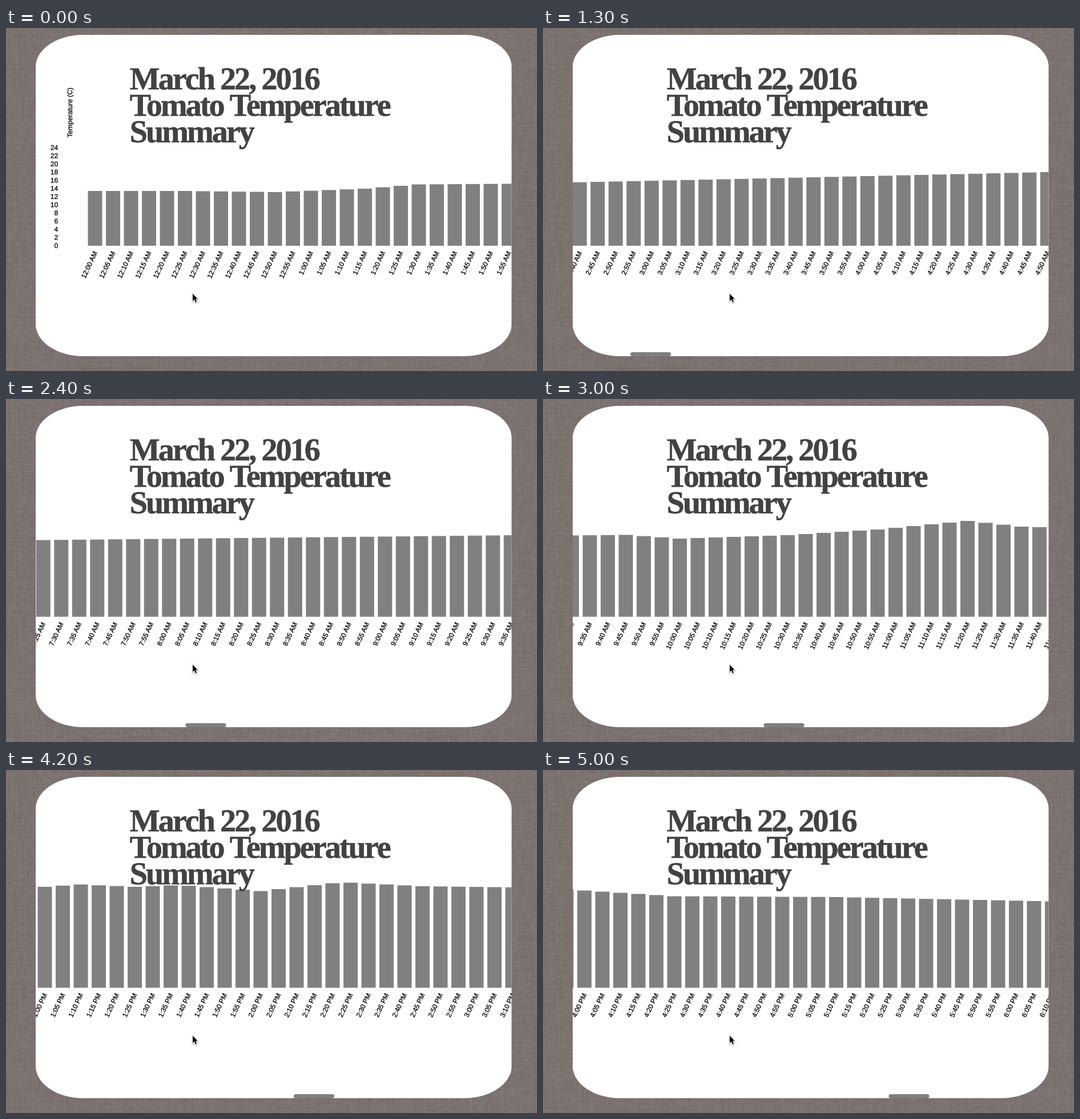
A matplotlib script that plays this animation: 930x602 px, repeating every 5.1 s.

```python
import numpy as np
import matplotlib.pyplot as plt
from matplotlib.animation import FuncAnimation
from matplotlib.patches import PathPatch, Polygon
from matplotlib.path import Path
from matplotlib.textpath import TextPath
from matplotlib.transforms import Affine2D

W, H, DPI = 930, 602, 100
PX = 72 / DPI
FRAMES, INTERVAL = 51, 100

LEFT, TOP, RIGHT, BOTTOM = 52, 12, 885.5, 576
BASE_Y, TICK_STEP = 382.2, 172 / 12
BAR_X, BAR_W, PITCH = 143.5, 25, 31.5
BAR_COUNT = 222

SANS = {"family": "Liberation Sans"}
SERIF = {"family": "Liberation Serif", "weight": "bold"}

# Turning points of the day: five-minute slot and bar top in pixels.
TURNS = [
    (0, 286), (5, 286), (10, 288), (15, 282), (18, 274.5), (30, 272),
    (40, 265.5), (58, 253), (72, 250.5), (80, 250.5), (117, 238.5),
    (120, 245), (126, 239), (131, 229), (136, 214), (139, 224), (144, 228.5),
    (158, 201), (161, 205), (163.5, 202), (168, 212.5), (172.5, 197),
    (177, 204), (191, 209.5), (197, 221.5), (206, 223), (221, 232.5),
]

# Scroll keys: frame and offset in pixels.
SCROLL_T = np.array([0, 8, 18, 30, 35, 42, 50])
SCROLL_X = np.array([0, 545.5, 1782.5, 3696.5, 3798.5, 5002, 6131.5])


def scroll_at(t):
    """Monotone cubic through the scroll keys, slow where a swipe runs out."""
    span = np.diff(SCROLL_T)
    mean = np.diff(SCROLL_X) / span
    inner = 2 * mean[:-1] * mean[1:] / (mean[:-1] + mean[1:])
    speed = np.concatenate([[mean[0] / 2], inner, [mean[-1]]])
    k = min(np.searchsorted(SCROLL_T, t, side="right") - 1, len(span) - 1)
    u = (t - SCROLL_T[k]) / span[k]
    ease = u * u * (3 - 2 * u)
    bend = u * (1 - u) * (speed[k] * (1 - u) - speed[k + 1] * u)
    return SCROLL_X[k] + span[k] * (mean[k] * ease + bend)


def advance(s, size, font):
    bar = TextPath((0, 0), "|", size, font).get_extents().x1
    return TextPath((0, 0), s + "|", size, font).get_extents().x1 - bar


def text_path(s, x, y, size=12, font=SANS, angle=0, align="left"):
    shift = -advance(s, size, font) if align == "right" else 0
    place = Affine2D().translate(shift, 0).scale(1, -1).rotate_deg(-angle)
    return TextPath((0, 0), s, size, font).transformed(place.translate(x, y))


def spaced_path(s, x, y, size, spacing):
    """Bold serif line with letter spacing and a tight capital T."""
    glyphs = []
    for ch, following in zip(s, s[1:] + " "):
        if ch != " ":
            glyphs.append(text_path(ch, x, y, size, SERIF))
        x += advance(ch, size, SERIF) + spacing
        if ch == "T" and following in "oe":
            x -= 0.095 * size
    return Path.make_compound_path(*glyphs)


def clock(i):
    hour, minute = divmod(i * 5, 60)
    return f"{hour % 12 or 12}:{minute:02d} {'AM' if hour < 12 else 'PM'}"


def linen():
    """Woven cloth: noise smeared along both thread directions."""
    rng = np.random.default_rng(4)
    cloth = np.zeros((H, W))
    for axis, length in ((1, 45), (0, 45), (1, 9), (0, 9)):
        kernel = np.ones(length) / np.sqrt(length)
        noise = rng.normal(size=(H, W))
        cloth += np.apply_along_axis(np.convolve, axis, noise, kernel, "same")
    rgb = np.array([124, 114, 111]) + 2 * cloth[..., None]
    return np.clip(rgb, 0, 255).astype(np.uint8)


def card_outline():
    """Rectangle with elliptic corners of a tenth of each side."""
    t = np.linspace(0, 2 * np.pi, 400)
    w, h = RIGHT - LEFT, BOTTOM - TOP
    x = (LEFT + RIGHT) / 2 + w * (0.4 * np.sign(np.cos(t)) + 0.1 * np.cos(t))
    y = (TOP + BOTTOM) / 2 + h * (0.4 * np.sign(np.sin(t)) + 0.1 * np.sin(t))
    return np.column_stack([x, y])


fig = plt.figure(figsize=(W / DPI, H / DPI), dpi=DPI)
ax = fig.add_axes([0, 0, 1, 1])
ax.imshow(linen(), extent=(0, W, H, 0), aspect="auto", interpolation="nearest")
ax.set_xlim(0, W)
ax.set_ylim(H, 0)
ax.axis("off")

card = ax.add_patch(Polygon(card_outline(), fc="white", lw=0, zorder=1))


def add_path(path, color, weight=0, zorder=2, clipped=True):
    """Filled path; weight thickens it by an outline in pixels."""
    patch = ax.add_patch(PathPatch(path, fc=color, ec=color, lw=weight * PX,
                                   zorder=zorder))
    patch.set_snap(False)
    if clipped:
        patch.set_clip_path(card)
    return patch


# Chart content, laid out unscrolled.
slots = np.arange(BAR_COUNT)
lefts = BAR_X + PITCH * slots
tops = np.interp(slots, *zip(*TURNS))
bars = [
    Path.unit_rectangle().transformed(
        Affine2D().scale(BAR_W, BASE_Y - top).translate(x, top))
    for x, top in zip(lefts, tops)
]
labels = [
    text_path(clock(i), x + 16.8, 394.3, angle=65, align="right")
    for i, x in zip(slots, lefts)
]
ticks = [
    text_path(str(2 * k), 91.2, BASE_Y - TICK_STEP * k + 3.8, align="right")
    for k in range(13)
]
axis_title = text_path("Temperature (C)", 116, 192, angle=90)

bar_patch = add_path(bars[0], "#827f81")
label_patch = add_path(labels[0], "black", 0.3)
axis_patch = add_path(Path.make_compound_path(axis_title, *ticks), "black", 0.3)

for row, line in enumerate(["March 22, 2016", "Tomato Temperature", "Summary"]):
    add_path(spaced_path(line, 216.7, 107.7 + 46.4 * row, 56, -2.9),
             "#424143", 0.6, zorder=3, clipped=False)

thumb, = ax.plot([], [], color="black", alpha=0.5, lw=7 * PX, snap=False,
                 solid_capstyle="round", zorder=4)

# Mouse pointer with a soft shadow and a white rim.
arrow = np.array([(327, 466.4), (327, 479), (329.8, 476.4), (331.9, 481.3),
                  (334, 480.4), (331.9, 475.6), (335.7, 475.6)])
for width in (4, 2.5):
    ax.add_patch(Polygon(arrow + (0, 1.2), fc="black", ec="black", alpha=0.1,
                         lw=width * PX, zorder=5))
ax.add_patch(Polygon(arrow, fc="black", ec="white", lw=1.8 * PX, zorder=5))
ax.add_patch(Polygon(arrow, fc="black", lw=0, zorder=6))


def draw(frame):
    offset = scroll_at(frame)
    first = max(0, int((offset + LEFT - BAR_X) // PITCH) - 1)
    seen = slice(first, first + 30)
    bar_patch.set_path(Path.make_compound_path(*bars[seen]))
    label_patch.set_path(Path.make_compound_path(*labels[seen]))
    move = Affine2D().translate(-offset, 0) + ax.transData
    for patch in (bar_patch, label_patch, axis_patch):
        patch.set_transform(move)

    x = 54 + 0.0899 * offset
    thumb.set_data([x + 3.5, x + 68], [572.5, 572.5])
    thumb.set_visible(frame > 0)
    return bar_patch, label_patch, axis_patch, thumb


anim = FuncAnimation(fig, draw, frames=FRAMES, interval=INTERVAL, repeat=True,
                     repeat_delay=0, blit=False)
plt.show()
```
